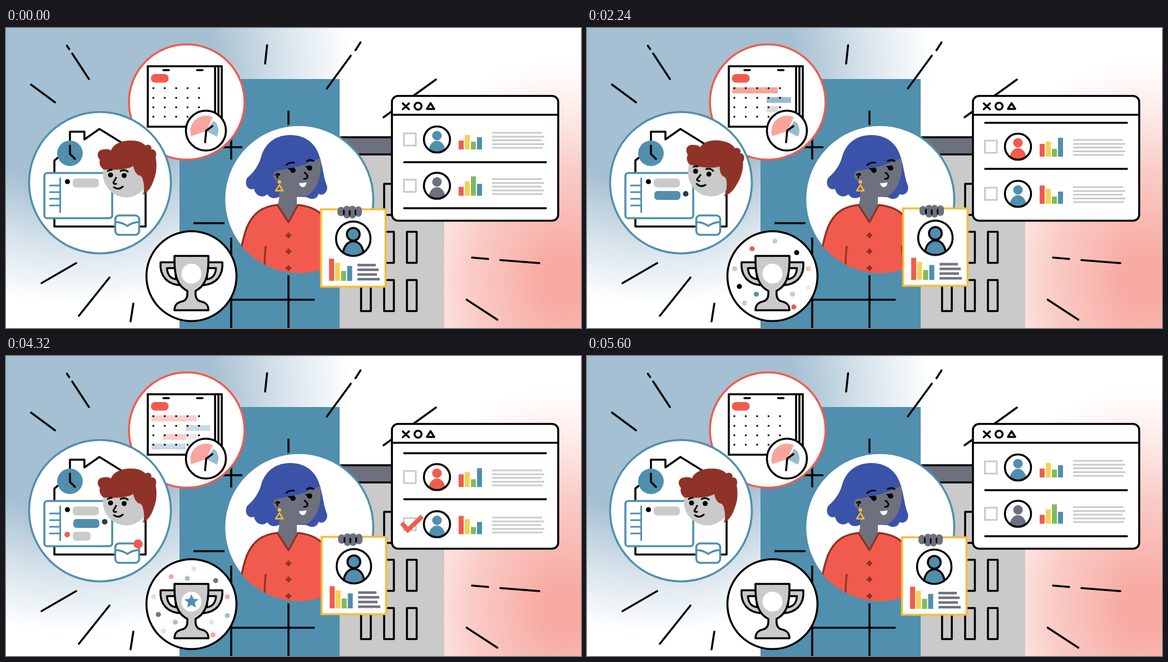
Write an HTML page without scripts that moves like this. It is 1034x541 px and loops after 5760 ms.

```html
<!DOCTYPE html>
<html lang="en">
<head>
<meta charset="utf-8">
<title>Hiring scene</title>
<style>
html, body { margin: 0; width: 100%; height: 100%; overflow: hidden; background: #fff; }
svg { display: block; width: 100%; height: 100%; }
:root { --red: #f15b4e; --blue: #508fad; --gray: #cacaca; --dark: #6d717d; --maroon: #8f3228; --yellow: #f5d152; --green: #80bb5c; --gold: #f6bd33; }
.red { fill: var(--red); } .blue { fill: var(--blue); } .gray { fill: var(--gray); }
.dark { fill: var(--dark); } .maroon { fill: var(--maroon); } .white { fill: #fff; } .gold { fill: var(--gold); }
.ink, .rim { stroke: #000; stroke-width: 3.6; stroke-linecap: round; stroke-linejoin: round; }
.ink { fill: none; }
.trim { stroke: var(--blue); stroke-width: 3.6; stroke-linecap: round; stroke-linejoin: round; }
.bars path { fill: none; stroke-width: 9; }
.bars :nth-child(1) { stroke: var(--red); } .bars :nth-child(2) { stroke: var(--yellow); }
.bars :nth-child(3) { stroke: var(--green); } .bars :nth-child(4) { stroke: var(--blue); }

/* every animation shares one loop */
.head, .list, .reach, .smile, .tick, .early, .late, .leave, .leave-first {
  animation: 5760ms cubic-bezier(.65, 0, .35, 1) infinite both;
}
.head { animation-name: nod; transform-origin: 230px 303px; }
.list { animation-name: scroll; }
.reach { animation-name: reach; }
.smile { animation-name: smile; transform-origin: 533px 280px; }
.tick { animation-name: tick; stroke-dasharray: 1 2; }
.early, .late { animation-timing-function: linear; animation-delay: var(--at); }
.early { animation-name: early; } .late { animation-name: late; }
.leave { animation-name: leave; animation-timing-function: linear; }
.leave-first { animation-name: leave-first; animation-timing-function: linear; }

@keyframes nod { 0%, 17.4% { transform: none; } 37.5%, 45.1% { transform: rotate(10deg); } 65.3%, 100% { transform: none; } }
@keyframes scroll { 0%, 8.7% { transform: translateY(0); } 35.1%, 70.6% { transform: translateY(-154px); } 97%, 100% { transform: translateY(0); } }
@keyframes reach { 0%, 31.3% { transform: translate(0, 0); } 48.7%, 63.9% { transform: translate(var(--dx), var(--dy)); } 81.2%, 100% { transform: translate(0, 0); } }
@keyframes smile { 0%, 39% { transform: scale(1); } 50%, 65.5% { transform: scale(1.25); } 75%, 100% { transform: scale(1); } }
@keyframes tick { 0%, 45.1% { stroke-dashoffset: 1; } 53.5%, 97% { stroke-dashoffset: 0; } 97.1%, 100% { stroke-dashoffset: 1; } }
@keyframes early { 0% { opacity: 0; } 4.2%, 69.4% { opacity: 1; } 69.5%, 100% { opacity: 0; } }
@keyframes late { 0% { opacity: 0; } 4.2%, 46.8% { opacity: 1; } 46.9%, 100% { opacity: 0; } }
@keyframes leave { 0%, 77.8% { opacity: 1; } 82.6%, 99.9% { opacity: 0; } 100% { opacity: 1; } }
@keyframes leave-first { 0%, 71.5% { opacity: 1; } 79.2%, 99.9% { opacity: 0; } 100% { opacity: 1; } }
</style>
</head>
<body>
<svg viewBox="0 0 1034 541" preserveAspectRatio="none">
<defs>
  <radialGradient id="sky" gradientUnits="userSpaceOnUse" cx="0" cy="0" r="1" gradientTransform="translate(130 70) scale(490 430)">
    <stop offset=".5" stop-color="#a5c0d2"/><stop offset=".75" stop-color="#a5c0d2" stop-opacity=".45"/><stop offset="1" stop-color="#a5c0d2" stop-opacity="0"/>
  </radialGradient>
  <radialGradient id="blush" gradientUnits="userSpaceOnUse" cx="0" cy="0" r="1" gradientTransform="translate(1000 455) scale(330 400)">
    <stop offset=".12" stop-color="#f7aba3"/><stop offset=".5" stop-color="#f9c3bc" stop-opacity=".85"/><stop offset="1" stop-color="#fbd5d0" stop-opacity="0"/>
  </radialGradient>
  <pattern id="pink" width="3" height="3" patternUnits="userSpaceOnUse">
    <path fill="#f9b0a8" d="M0 0h3v3H0z"/><circle cx="1.5" cy="1.5" r=".9" fill="#f38d82"/>
  </pattern>
  <clipPath id="portrait"><circle cx="526.5" cy="309" r="133"/></clipPath>
  <clipPath id="view"><path d="M700 167h285v166H700z"/></clipPath>
  <clipPath id="badge"><circle cx="775" cy="201" r="23"/></clipPath>
  <clipPath id="photo"><circle cx="624.5" cy="380" r="30"/></clipPath>
  <circle id="dot" r="4.6"/>
  <rect id="pane" width="17.5" height="56" class="ink"/>
  <path id="button" class="maroon" d="M-2-5h4v3h3v4h-3v3h-4v-3h-3v-4h3z"/>
  <g id="row">
    <path fill="none" stroke="#cacaca" stroke-width="3" d="M715.500 190h21.500v22h-21.500z"/>
    <circle cx="775" cy="201" r="23.500" class="white"/>
    <g clip-path="url(#badge)" fill="currentColor"><circle cx="775" cy="194" r="8.600"/><path d="M760 226c-1-30 31-30 30 0z"/></g>
    <circle cx="775" cy="201" r="23.500" class="ink"/>
    <path stroke="#cacaca" stroke-width="3.200" d="M874 189h90M874 196h94M874 202.500h89M874 209.500h94M874 216h91"/>
  </g>
  <path id="rule" class="ink" d="M716 242h255"/>
</defs>

<path fill="url(#sky)" d="M0 0h1034v541H0z"/>
<path fill="url(#blush)" d="M0 0h1034v541H0z"/>

<!-- buildings -->
<path class="blue" d="M312 92h288v449H312z"/>
<path class="gray" d="M600 228h188v313H600z"/>
<path class="dark" d="M600 197h110v31H600z"/>
<path class="ink" d="M602 197h108M602 228h108"/>
<use href="#pane" x="680" y="281"/><use href="#pane" x="680" y="367.500"/><use href="#pane" x="721" y="367.500"/>
<use href="#pane" x="638.500" y="454.500"/><use href="#pane" x="680" y="454.500"/><use href="#pane" x="721" y="454.500"/>
<path class="ink" style="stroke-linecap:butt" d="M508 149v30M508 446v95M405 190v47M405 378v163M390 215h35M337 352h56M405 490h150"/>

<!-- rays -->
<path class="ink" d="M45 102l43 32M109.500 32l4 6M119 46l30 46M469.500 31l-3.500 33M637.500 26l-9 14M620 50l-43 59M773 93l-94 68M838 414l29 2.500M889 418.500l70 5.500M828.500 490l55 36M126 424l-62 36M186 450l-55 69M229 497l-5 32"/>

<!-- calendar -->
<circle cx="325" cy="133.500" r="104" class="white" stroke="#f15b4e" stroke-width="3.600"/>
<path class="rim white" style="stroke-linejoin:miter" d="M255 69h133v109H255z"/>
<path class="ink" d="M376 69v109M382 69v109M283 76h10M343.500 76h10"/>
<rect x="260.500" y="83" width="32" height="15.500" rx="7.700" class="red"/>
<g class="leave-first">
  <path class="early" style="--at:800ms" fill="#dadada" d="M323 141h20.500v10.500H323z"/>
  <path class="early" style="--at:960ms" fill="url(#pink)" d="M261.500 107H343v11h-81.500z"/>
  <path class="early" style="--at:1740ms" fill="#9abbcd" d="M323 124.500h44V135h-44z"/>
  <path class="late" style="--at:3040ms" fill="url(#pink)" d="M282 140.500h41v11h-41z"/>
  <path class="late" style="--at:3300ms" fill="#9abbcd" d="M261.500 158H323v10.500h-61.500z"/>
</g>
<path class="ink" stroke-dasharray="0 20.500" d="M265 108.500h83M265 126h83M265 143h83M265 160h83"/>
<circle cx="359.500" cy="185" r="36" class="rim white"/>
<path fill="url(#pink)" d="M360 186l-27 9a28 28 0 0 1 39-34z"/>
<path fill="#9abbcd" d="M360 186l13-19a22 22 0 0 1 6 29z"/>
<path class="ink" d="M360 185l-2 21M360 185l11-8"/>

<!-- remote worker -->
<circle cx="169" cy="279" r="127.500" class="white" stroke="#508fad" stroke-width="3.600"/>
<path class="ink" d="M93 234l-6 5v119h164v-72M115 205v-18h26v14l27-19 45 28"/>
<circle cx="115" cy="226" r="23" class="blue"/>
<path class="ink" d="M115 212v15l9 9"/>
<rect x="69" y="261.500" width="122" height="81.500" rx="5" class="trim white"/>
<path class="trim" fill="none" style="stroke-width:3" d="M97.500 271v61M79 284h18M79 296h18M79 308h18M79 320h18"/>
<use href="#dot" x="110.500" y="277"/>
<rect x="120" y="271.500" width="47" height="16" rx="6" class="gray"/>
<rect x="196.500" y="338" width="43" height="35" rx="7" class="trim white"/>
<path class="trim" fill="none" d="M197 350q11 0 21 7 10-7 21-7"/>
<g class="leave">
  <g class="early" style="--at:960ms"><rect x="121" y="294" width="47" height="16" rx="6" class="blue"/><circle cx="177.500" cy="299" r="5" fill="#253c50"/></g>
  <g class="late" style="--at:2960ms"><rect x="120" y="317" width="32" height="16" rx="6" class="gray"/><circle cx="110" cy="322" r="5" class="red"/></g>
  <circle class="red late" style="--at:3240ms" cx="237.500" cy="339" r="8.300"/>
</g>
<g class="head">
  <ellipse cx="216" cy="262" rx="42" ry="43.500" class="gray"/>
  <path class="maroon" d="M175 255C169 250 167 244 169 238C162 231 164 219 176 219C182 218 187 219 189 221C192 209 210 202 226 203C237 203 245 206 251 212C255 208 264 212 261 219C266 217 273 224 269 233C272 247 271 262 265 276C261 288 254 297 246 301C250 290 248 279 245 270C238 266 231 262 229 249C214 257 192 256 175 255Z"/>
  <circle cx="238" cy="273" r="7.500" class="gray"/>
  <circle cx="188" cy="265" r="4.500"/><circle cx="212.500" cy="266" r="4.500"/>
  <path class="ink" style="stroke-width:3" d="M183 258q3-3 7-2M206 258q7-4 13 1M198 270l-5 9q1 3 5 2M194 287q8 6 16-1"/>
</g>

<!-- candidate portrait -->
<circle cx="526.500" cy="309" r="134" class="white" stroke="#508fad" stroke-width="3.600"/>
<g clip-path="url(#portrait)">
  <path fill="#3a52a8" d="M511 193C485 193 468 207 460 228C456 246 446 260 434 270C427 282 436 294 446 290C449 304 462 307 470 300C476 309 487 308 493 303L541 305C550 311 560 308 562 299C570 304 580 296 577 284C571 270 571 256 565 236C559 210 540 193 511 193Z"/>
  <path class="dark" d="M490 257C510 254 545 246 565 234C569 258 563 285 547 299C538 306 530 303 523 303V320L508 350 488 320C492 310 492 300 491 280Z"/>
  <circle cx="489" cy="266" r="9" class="dark"/>
  <path class="ink" style="stroke-width:2.500" d="M485 265q3-4 7-1-5 2-4 6"/>
  <path class="red" stroke="#8f3228" stroke-width="3.600" stroke-linejoin="round" d="M488 319L508 350 525 319C549 322 566 329 578 350L600 460H415C418 420 424 385 433 360C444 334 460 322 488 319Z"/>
  <path fill="none" stroke="#8f3228" stroke-width="3.200" stroke-linecap="round" d="M467 394q-2 16-2 36"/>
  <path class="reach" style="--dx:-24px;--dy:0px" fill="none" stroke="#8f3228" stroke-width="3.200" stroke-linecap="round" d="M574 394q2 16 2 36"/>
  <use href="#button" x="508" y="374"/><use href="#button" x="508" y="403"/><use href="#button" x="508" y="433"/>
</g>
<circle cx="516" cy="256.500" r="4.800"/><circle cx="546" cy="252.500" r="4.800"/>
<path class="ink" style="stroke-width:3" d="M504 247q7-6 14-4M541 240q6-4 12 0M509 254l6 1M540 250l5 1M537 261q5 3 5 7 0 4-6 4"/>
<path class="white smile" d="M526.500 279.500q7 1 14-1.500-1 9-7 9-5-1-7-7.500z"/>
<circle cx="491.500" cy="277.500" r="3.300" class="gold"/>
<path fill="none" stroke="#f6bd33" stroke-width="2.500" stroke-linejoin="round" d="M491.500 283l-6.500 10.500h13z"/>

<!-- résumé -->
<g class="reach" style="--dx:6px;--dy:-5px">
  <path class="white" stroke="#f6bd33" stroke-width="3.600" d="M566.500 327h116v139.500h-116z"/>
  <circle cx="624.500" cy="380" r="31" class="white"/>
  <g clip-path="url(#photo)"><path class="rim blue" d="M606 414c-3-39 40-39 37 0z"/></g>
  <circle cx="624.500" cy="372" r="11.500" class="rim blue"/>
  <circle cx="624.500" cy="380" r="31" class="ink"/>
  <g class="bars"><path d="M585.500 456v-40"/><path d="M596 456v-32.500"/><path d="M607 456v-18"/><path d="M618 456v-27"/></g>
  <path stroke="#6d717d" stroke-width="4.500" d="M632 427.500h33M632 436h38M632 444.500h35M632 453h40"/>
  <path fill="none" stroke="#6d717d" stroke-width="13" stroke-linecap="round" d="M602.500 329v4M613 327v10M623 327v10M633.500 328v6"/>
  <path class="ink" style="stroke-width:3" d="M607.500 329v7M618 330v7M628.500 329v7"/>
</g>

<!-- candidate list -->
<rect x="694" y="122.500" width="299" height="225" rx="11" class="rim white"/>
<path class="ink" d="M694 156.500h299M713.500 136l11 10.500M724.500 136l-11 10.500M763.500 135.500l6.500 10.500h-13z"/>
<circle cx="741" cy="141" r="6.300" class="ink"/>
<g clip-path="url(#view)">
  <g class="list">
    <use href="#row" color="#508fad"/>
    <use href="#row" y="83.500" color="#6d717d"/>
    <use href="#row" y="167" color="#f15b4e"/>
    <use href="#row" y="252" color="#508fad"/>
    <use href="#rule"/><use href="#rule" y="83"/><use href="#rule" y="166"/>
    <g class="bars"><path d="M818.500 219v-16"/><path d="M829.500 219v-26"/><path d="M840.500 219v-14"/><path d="M851.500 219v-22"/></g>
    <g class="bars"><path d="M818.500 302.500v-16"/><path d="M829.500 302.500v-26"/><path d="M840.500 302.500v-35"/><path d="M851.500 302.500v-21.500"/></g>
    <g class="bars"><path d="M818.500 386v-23"/><path d="M829.500 386v-27"/><path d="M840.500 386v-14"/><path d="M851.500 386v-34"/></g>
    <g class="bars"><path d="M818.500 471v-33"/><path d="M829.500 471v-27"/><path d="M840.500 471v-13"/><path d="M851.500 471v-22"/></g>
    <path class="tick" pathLength="1" fill="none" stroke="#f15b4e" stroke-width="8" d="M711.500 451l11 12.500 26-24.500"/>
  </g>
</g>

<!-- trophy -->
<circle cx="333.500" cy="447.500" r="81" class="rim white"/>
<path class="rim gray" d="M304 422.500H278C276 446 289 463 315 464H352C378 463 391 446 389 422.500H363Z"/>
<path class="rim white" d="M304 433H289.500C290 445 296 452 306 453ZM363 433H377.500C377 445 371 452 361 453Z"/>
<path class="rim gray" d="M303 411H364V420C364 450 357 466 341 474C340 484 342 491 350 493C360 495 364 500 364 509H303C303 500 307 495 317 493C325 491 327 484 326 474C310 466 303 450 303 420Z"/>
<circle cx="333.500" cy="443" r="18" class="white"/>
<g class="leave">
  <path class="blue late" style="--at:3160ms" d="M333.500 429.500l3.700 8.400 9.100.9-6.900 6 2 9-7.900-4.700-7.900 4.700 2-9-6.900-6 9.100-.9z"/>
</g>
<g class="leave-first">
  <use href="#dot" x="274" y="466" class="early" style="--at:1120ms"/>
  <use href="#dot" x="369.500" y="480" class="gray early" style="--at:1320ms"/>
  <use href="#dot" x="297" y="398" class="red early" style="--at:1400ms"/>
  <use href="#dot" x="283" y="496" class="gray early" style="--at:1480ms"/>
  <use href="#dot" x="372" y="503" class="red early" style="--at:1560ms"/>
  <use href="#dot" x="377" y="405" class="early" style="--at:1640ms"/>
  <use href="#dot" x="304.500" y="480" class="blue early" style="--at:1700ms"/>
  <use href="#dot" x="338" y="384" class="gray early" style="--at:1740ms"/>
  <use href="#dot" x="265.500" y="434" class="gray late" style="--at:1960ms"/>
  <use href="#dot" x="398" y="434" class="red late" style="--at:2150ms"/>
  <use href="#dot" x="398" y="468" class="blue late" style="--at:2210ms"/>
  <use href="#dot" x="326" y="401" class="blue late" style="--at:2400ms"/>
</g>
</svg>
</body>
</html>
```
